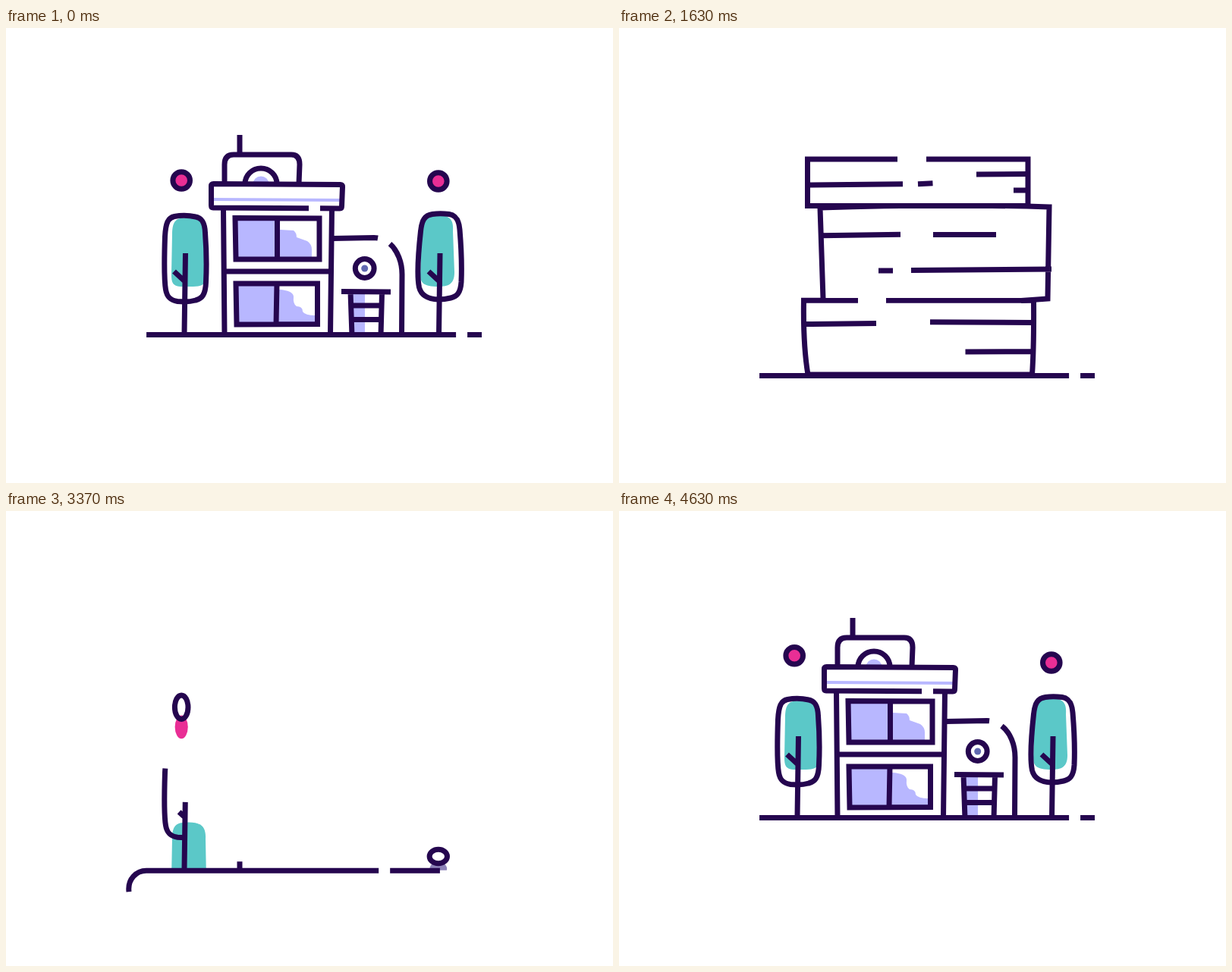
An HTML page for the animation above (4.66 s loop, 800x600 px).

```html
<!DOCTYPE html>
<html lang="en">
<head>
<meta charset="utf-8">
<title>Building and stack</title>
<style>
  html, body { margin: 0; width: 100%; height: 100%; overflow: hidden; background: #fff; }
  svg { display: block; width: 100vw; height: 100vh; }
  .line { fill: none; stroke: #25064f; stroke-width: 7; }
  .lilac { fill: #b8b7ff; }
  .teal { fill: #5bc8c8; }
  .pink { fill: #e92e95; }
  .paper { fill: #fff; }
</style>
</head>
<body>
<svg viewBox="0 0 800 600">
  <clipPath id="above"><rect id="mask" x="0" y="-100" width="800" height="600"/></clipPath>
  <g clip-path="url(#above)">
    <g id="house">
      <path class="line" id="walls"/>
      <g id="roof">
        <path class="lilac" id="archFill"/>
        <path class="line" id="top"/>
        <path fill="none" stroke="#b8b7ff" stroke-width="4" d="M274 226 L441 227"/>
        <path class="line" id="belt"/>
      </g>
      <path class="line" id="floor" d="M287 321 H428"/>
      <g id="win1">
        <path class="lilac" d="M303 252 H357 V304 H304Z M361 266 L379 267 Q383 270 383 276 L397 281 Q403 285 403 292 V303 H361Z"/>
        <path class="line" d="M302 250.5 L413 251 V305 H303Z M357.5 251 V305"/>
      </g>
      <g id="win2">
        <path class="lilac" d="M304 338 H357 L356 390 H305Z M360 345 Q378 346 379 354 Q378 364 383 367 Q391 367 391 374 Q394 379 408 379 V389 H359Z"/>
        <path class="line" d="M303 337 H410.5 V390.5 L304 391Z M357 337 L356 391"/>
      </g>
      <path class="line" id="porch" d="M431 277.5 L485 276.500 C508 277 522 300 522 325 L521.500 404"/>
      <circle id="eye" cx="472.7" r="4.5" fill="#6068b0"/>
      <circle class="line" id="lamp" cx="472.7" r="12.4"/>
      <g id="door">
        <path class="lilac" d="M456 350 H473 V404 H457Z"/>
        <path class="line" d="M442 347.500 L507 348 M454 348 L456 406 V500 M495.500 349 L494 406 V500 M455 366 H495 M456 384.500 H494"/>
      </g>
    </g>
    <g id="trees"></g>
    <g id="balls"></g>
  </g>
  <path class="line" id="ground" d="M162 640 V502 C160 485 172 474 185 474 H627"/>
  <g id="stack">
    <g>
      <path class="paper" d="M243.5 359 Q243 420 249 457 L545 457 L547 359Z"/>
      <path class="line" id="lowTop" d="M240 359.300 H549"/>
      <path class="line" d="M243.500 359 Q242.500 418 249 457 L544.500 457 Q547 420 546.500 359 M246 390.500 L339 389.500 M410 387.800 L547 388.500 M456.500 427 L546 426.500"/>
    </g>
    <g>
      <path class="paper" d="M265 237 H567 L565 356 H269Z"/>
      <path class="line" d="M269 357 L265 237 Q420 231.500 567 236 L565 357 L530 359.500 M267 273.700 L371 272.300 M414 272.500 H497 M342 320 H361 M385 319.500 L570 318"/>
    </g>
    <g>
      <path class="paper" d="M248 173 H539 V235 H248Z"/>
      <path class="line" id="highTop" d="M248.500 173 H539 V234.500 H248.500Z"/>
      <path class="line" d="M248 207 L374 205.700 M394 205.700 L413.500 204.700 M471 193 L540 192.500 M520 214 H540"/>
    </g>
  </g>
</svg>
<script>
const LOOP = 4660, NS = 'http://www.w3.org/2000/svg';
const $ = id => document.getElementById(id);
const set = (el, o) => { for (const k in o) el.setAttribute(k, o[k]); };
const add = (parent, tag, o) => {
  const el = document.createElementNS(NS, tag);
  set(el, o);
  return parent.appendChild(el);
};
const show = (el, on) => { el.style.display = on ? '' : 'none'; };
const shift = (el, y) => set(el, { transform: `translate(0 ${y})` });
const clamp = (v, a = 0, b = 1) => Math.max(a, Math.min(b, v));
const leaving = t => t < 2000;

// Easing: all take a start time and a duration
const part = (t, start, dur) => clamp((t - start) / dur);
const out = (t, start, dur) => 1 - (1 - part(t, start, dur)) ** 2;
const inOut = (t, start, dur) => {
  const u = part(t, start, dur);
  return u < .5 ? 4 * u ** 3 : 1 - 4 * (1 - u) ** 3;
};
// What is left of a move that overshoots: 1 to 0, dipping below 0
const back = (t, start, dur = 700, c = 1.7) => {
  const p = 1 - part(t, start, dur);
  return p * p * ((c + 1) * p - c);
};

// Show a path from length a to b, with an optional gap at g
function dash(el, a, b, g = 1e5, w = 15) {
  const parts = g >= b || g + w <= a ? [0, a, b - a] :
    [0, a, Math.max(0, g - a), g < a ? g + w - a : w, Math.max(0, b - g - w)];
  el.setAttribute('stroke-dasharray', [...parts, 5000].join(' '));
}

const trees = [
  {
    x: 235, start: 3210, end: 120,
    edge: 'M235 361 L226 360.5 C216 359 212 354 210.5 345 C208 330 208.5 305 209.5 275 C210.5 256 214 250 222 248.5 Q236 246 250 249 C258 250.5 262 256 262.5 270 C264 290 264.5 315 263.5 335 C263 352 258 357 250 359 Q243 361 235 361',
    leaf: 'M218 325 L219 272 C219 252 226 250 241 250 C256 250 264 255 263 272 L264 325 C264 341 255 341 243 341 H232 C220 341 218 336 218 325Z'
  },
  {
    x: 570.5, start: 3435, end: 150,
    edge: 'M570 358 C556 357.5 547 352 544.5 342 C542 330 543 300 546.5 268 C548 253 552 247 562 245.5 Q572 244 584 245.5 C593 247 597 253 598 266 C600 290 601 312 600 335 C599 350 594 354 586 356 Q578 358 570 358',
    leaf: 'M546 325 L548 265 C549 248 556 247 568 247 C585 247 590 252 589 268 L591 322 C591 338 583 341 570 341 C550 341 546 336 546 325Z'
  }
];
for (const k of trees) {
  k.g = add($('trees'), 'g', {});
  k.leafEl = add(k.g, 'path', { class: 'teal', d: k.leaf });
  k.edgeEl = add(k.g, 'path', { class: 'line', d: k.edge });
  k.stemEl = add(k.g, 'path', { class: 'line' });
  k.len = k.edgeEl.getTotalLength();
}

const balls = [
  { x: 231.2, rest: 201, drop: 340, land: 3108, depth: 255 },
  { x: 569.8, rest: 202, drop: 325, land: 3360, depth: 188 }
];
for (const b of balls) {
  b.dot = add($('balls'), 'ellipse', { class: 'pink', cx: b.x });
  b.ring = add($('balls'), 'ellipse', { class: 'line', cx: b.x });
}

// Falls away first; later drops in and swings out like a damped spring
function ballY(b, t) {
  if (leaving(t)) return b.rest + .00052 * Math.max(0, t - b.drop) ** 2;
  const s = Math.max(0, t - b.land);
  return b.rest + groundY(t) - 404 - 500 * (1 - part(t, b.land - 220, 220) ** 2)
    + b.depth * Math.exp(-.0021 * s) * Math.cos(Math.PI * s / 498);
}

// Downward exit of the stack and the ground under it
function leave(t) {
  if (t < 1630) return 0;
  const s = (t - 1630) / 100;
  return 1.11 * s ** 3 - .75 * s * s - 9 * Math.sin(Math.PI * clamp(s / 3));
}

function groundY(t) {
  if (t < 2500) return 404 + 54 * inOut(t, 200, 1140) + leave(t);
  return 472 + 15 * inOut(t, 3200, 550) - 83 * inOut(t, 3700, 925);
}

const fall = (t, i) => -510 * (1 - part(t, 650 + 120 * i, 480) ** 1.5);

function drawGround(t, y) {
  const el = $('ground'), len = el.getTotalLength(), at = x => len - 627 + x;
  show(el, t < 2400 || t > 2580);
  shift(el, y - 473.6);
  if (t < 2500) return dash(el, at(185), len, at(593));
  const head = 36 + (len - 36) * out(t, 2580, 1140);
  const tail = 138 * out(t, 2700, 400) + (at(185) - 138) * inOut(t, 3380, 270);
  dash(el, tail, head, at(180 + 413 * out(t, 2600, 1530)));
}

function drawHouse(t, g) {
  show($('house'), t < 1500 || t > 3200);
  const gone = leaving(t), rise = (depth, ...timing) => gone ? 0 : depth * back(t, ...timing);
  const sink = gone ? Math.max(0, 460 + fall(t, 0) - 141 - g) : 0;
  shift($('house'), g + sink);

  const lift = rise(424, 3300, 1100, 2.6);
  const s = gone ? 0 : 1 - inOut(t, 3870, 430);
  const b = 205.5 - 4 * s, top = 167 - 12 * s, arch = 20.5 + 6 * s, r = 10 + 5 * s;
  shift($('roof'), lift);
  set($('walls'), { d: `M286.5 ${238 + lift} L288 404 V900 M429.500 ${238 + lift} L427.500 404 V900` });
  set($('top'), { d: `M308 ${141 - 35 * s} V${top} M288 ${b} V${top + 13} Q288 ${top} 300 ${top} H376 Q387 ${top} 387 ${top + 13} L386 ${b} `
    + `M315 ${b} A21 ${arch} 0 0 1 357 ${b}` });
  set($('archFill'), { d: `M325.5 ${b} A10.500 ${r} 0 0 1 346.500 ${b}Z` });
  set($('belt'), { d: `M273 237 L440 238 Q442.500 238 442.500 235 L443.500 ${b + 4} Q443.500 ${b + 1} 440.500 ${b + 1} `
    + `L273.500 ${b} Q270.500 ${b} 270.500 ${b + 3} V234 Q270.500 237 273 237` });
  dash($('belt'), 0, 1000, gone ? 126 + 2 * out(t, 0, 770) : 91 + 35 * out(t, 3870, 760));

  shift($('win1'), rise(200, 3611));
  shift($('door'), rise(75, 3786));
  shift($('floor'), rise(100, 3817));
  shift($('win2'), rise(80, 3860));

  const lamp = q => gone ? 0 : 200 * back(q, 3555);
  const y = 317 + lamp(t);
  set($('lamp'), { cy: y });
  set($('eye'), { cy: y - 2.5 * (lamp(t + 8) - lamp(t - 8)) });
  dash($('porch'), 0, gone ? 300 : 200 * out(t, 3820, 400), gone ? 59 + 7 * out(t, 0, 770) : 57, 18);
}

function drawTree(k, t, g) {
  const gone = leaving(t);
  const ease = (a, da, z, dz) => gone ? 1 - inOut(t, k.end + z, dz) : out(t, k.start + a, da);
  shift(k.g, g);
  dash(k.edgeEl, 0, k.len * ease(0, 800, 0, 500));
  shift(k.leafEl, 175 * (1 - ease(20, 500, 60, 490)));
  const h = 107 * (gone ? ease(0, 0, 180, 400) : 1 - back(t, k.start + 18, 750, 3));
  const f = ease(130, 100, 130, 250);
  set(k.stemEl, { d: `M${k.x} 404 L${k.x + 1.5 * h / 107} ${404 - h}`
    + (f > 0 ? ` M${k.x} 333.500 l${-13.5 * f} ${-12.5 * f}` : '') });
}

function drawBall(b, t, gy) {
  const on = t < 1100 || t > 2800;
  show(b.dot, on);
  show(b.ring, on);
  const y = ballY(b, t), v = (ballY(b, t + 8) - ballY(b, t - 8)) / 16;
  const k = clamp(Math.abs(v) - .45, 0, .6);
  const q = leaving(t) ? 0 : clamp((y - gy + 24) / 10);
  const sx = (1 - .53 * k) * (1 + .06 * q), sy = (1 + .95 * k) * (1 - .33 * q);
  set(b.ring, { cy: y, rx: 11.3 * sx, ry: 11.3 * sy });
  set(b.dot, { cy: y - 30 * v + 6 * q, rx: 11 * sx, ry: 11 * sy });
  b.dot.style.fill = q > .5 ? '#8d82b8' : '';
}

function drawStack(t) {
  show($('stack'), t > 600 && t < 2400);
  [...$('stack').children].forEach((el, i) => shift(el, fall(t, i) + leave(t)));
  const slide = .06 * (t - 1630);
  dash($('highTop'), 0, 2000, 118.5 - slide, 38);
  dash($('lowTop'), 0, 2000, 75 - slide, 37);
}

function draw(t) {
  const gy = groundY(t), g = gy - 404;
  set($('mask'), { height: gy + 100 });
  drawGround(t, gy);
  drawHouse(t, g);
  for (const k of trees) drawTree(k, t, g);
  for (const b of balls) drawBall(b, t, gy);
  drawStack(t);
}

let start;
function tick(now) {
  start ??= now;
  draw((now - start) % LOOP);
  requestAnimationFrame(tick);
}
draw(0);
requestAnimationFrame(tick);
</script>
</body>
</html>
```
